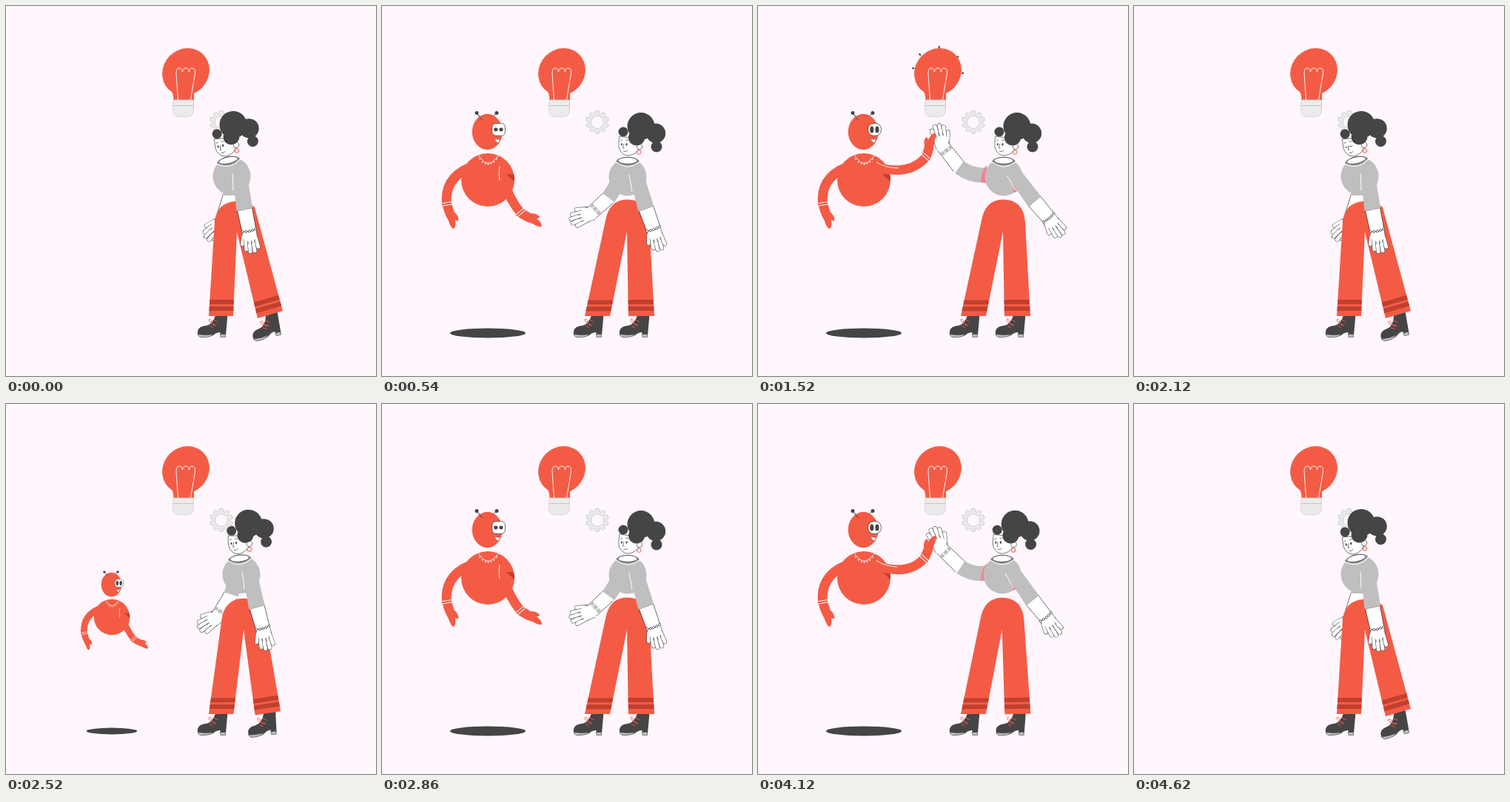
An HTML page for the animation above (4640 ms loop, 500 px wide and 500 px high).

```html
<!DOCTYPE html>
<html lang="en">
<head>
<meta charset="utf-8">
<title>High five</title>
<style>
html, body { margin: 0; width: 100%; height: 100%; overflow: hidden; background: #fff6fe; }
svg { display: block; width: 100vw; height: 100vh; }
</style>
</head>
<body>
<svg id="stage" viewBox="0 0 500 500"></svg>
<script>
const RED = '#f45b45', DEEP = '#c0402e', DARK = '#454545', GREY = '#bfbfbf', PALE = '#ebebeb', BG = '#fff6fe', PINK = '#f77f8b';
const CYCLE = 2320;

// Poses: pants outline, back foot, torso, head, near arm, far arm, robot
const walk = {
  pants: [274,419, 282,290, 286,266, 309,264, 326,263, 336,272, 374,412, 340,422, 312,305, 307,419],
  foot: [359,418,-15], torso: [305,230,-12], head: [-34.7,-1,-12.5], arm: [311,221,12],
  far: [303,225, 303,242, 303,256, 108,38,132], pink: [0],
  bot: [0,0, 0,0,0, 0], reach: [165,238, 173,262, 187,279, 30], crease: [159,217, 157,226, 159,236]
};
const stand = {
  pants: [274,419, 302,290, 307,262, 331,261.5, 359,262, 361,292, 368,419, 333,419, 331,305, 308,419],
  foot: [353,419,0], torso: [332,231,0], head: [0,0,0], arm: [338,222,20],
  far: [322,232, 314,248, 306,259, 137.6,31,158], pink: [0],
  bot: walk.bot, reach: walk.reach, crease: walk.crease
};
const raise = {
  ...stand, head: [4,1,0], arm: [338,222,39],
  far: [318,226, 296,229, 274,214, 234.5,34,263], pink: [1],
  bot: [-4,-2.5, -7.7,-3,-12, -12], reach: [158,215, 217,226, 217.5,191, -86], crease: [156,209, 168,217, 183,217]
};
const clap = {
  ...stand, arm: [338,222,40.5],
  far: [318,227, 293,233, 272,218, 232,36,254], pink: [1],
  reach: [162,218, 205,230, 227,204, -73], crease: [160,211, 172,219, 190,219]
};
const keys = [[0,walk],[40,walk],[370,stand],[720,stand],[1240,raise],[1360,clap],[1750,clap],[2060,walk],[CYCLE,walk]];

const clamp = x => Math.max(0, Math.min(1, x));
const seg = (t, a, b) => clamp((t - a) / (b - a));
const ease = x => (1 - Math.cos(Math.PI * x)) / 2;
const bump = (t, a, b) => Math.sin(Math.PI * seg(t, a, b));
const mix = (a, b, k) => a.map((v, i) => v + (b[i] - v) * k);
const polar = (x, y, deg, r) => [x + r * Math.cos(deg * Math.PI / 180), y + r * Math.sin(deg * Math.PI / 180)];

const path = (d, fill, stroke = 'none', w = 1, extra = '') =>
  `<path d="${d}" fill="${fill}" stroke="${stroke}" stroke-width="${w}" ${extra}/>`;
const line = (d, stroke, w = 1, cap = 'butt') => path(d, 'none', stroke, w, `stroke-linecap="${cap}"`);
const oval = (x, y, rx, ry, fill, stroke = 'none', w = .8) =>
  `<ellipse cx="${x}" cy="${y}" rx="${rx}" ry="${ry}" fill="${fill}" stroke="${stroke}" stroke-width="${w}"/>`;
const dot = (x, y, r, fill, stroke, w) => oval(x, y, r, r, fill, stroke, w);
const group = (tf, body) => `<g transform="${tf}">${body}</g>`;
const place = (x, y, deg, body) => group(`translate(${x} ${y}) rotate(${deg})`, body);

function poseAt(t) {
  let i = 0;
  while (i < keys.length - 2 && t >= keys[i + 1][0]) i++;
  const [ta, a] = keys[i], [tb, b] = keys[i + 1], k = ease(seg(t, ta, tb));
  const out = {};
  for (const n in a) out[n] = mix(a[n], b[n], k);
  return out;
}

function gear() {
  let d = '';
  for (let i = 0; i < 10; i++) {
    [[-13, 12], [-8, 15.5], [8, 15.5], [13, 12]].forEach(([a, r]) => {
      d += (d ? 'L' : 'M') + polar(291, 157, i * 36 - 90 + a, r);
    });
  }
  return path(d + 'Z', PALE, '#c6c6c6', .8, 'stroke-linejoin="round"') + dot(291, 157, 8.6, BG, '#c6c6c6');
}

const bulb =
  place(243, 89, -45, oval(0, 0, 33.2, 30.6, RED)) + path('M217 108Q227 115 226.500 127H254V118Q259 115 266 109Z', RED) +
  line('M232.500 127L230 91Q230 84 234 84Q238 84 238.500 89Q239 84 243 84Q247 84 247.500 89Q248 84 251 84Q256 84 255.500 91L249.500 127', '#fff', .9) +
  path('M226 127H253.500V141Q253 149.500 245 149.500H234Q226 149.500 225.500 141Z', PALE, '#cfcfcf', .8) +
  line('M225.500 134.500H253.500', '#bdbdbd', .8);
const scenery = bulb + gear();

function rays(t) {
  if (t < 1340 || t > 1720) return '';
  const len = 16 * Math.abs(Math.sin(Math.PI * (t - 1340) / 190));
  return [-172, -136, -87, -37, 3].map(a =>
    line(`M${polar(243, 89, a, 32)}L${polar(243, 89, a, 32.8 + len)}`, DARK, 2)).join('');
}

// Hand hanging down from the wrist at the local origin
const fingers = [[-8,5,-12,17], [-6,12,-8,25], [-2,13,-3,28.5], [3,13,3,28.5], [7,10,8.5,24]];
const hand = fingers.map(([a, b, c, d]) => {
  const f = `M${a} ${b}L${c} ${d}`;
  return line(f, DARK, 6, 'round') + line(f, '#fff', 4.9, 'round');
}).join('') + path('M-9.500 -2L-9.500 8Q-8 15 0 15Q8 15 9 10L9.500 -2Z', '#fff') +
  line('M-9.500 -2V5M9.500 -2L9.800 10M-4 14V18M1 14V19M5.500 13V17', DARK, .6);

const shoe =
  path('M-7.500 -2H8.500L6 26H-1.500V22Q-7 22 -11 26Q-15 28.500 -27 28.500Q-33 27 -32 20Q-30 13.500 -21 13Q-12 12 -7.500 -2Z', DARK) +
  path('M-32 24.500Q-22 26.500 -11 24.500Q-15 28.500 -22 28.500H-28Q-31 28 -32 24.500ZM-1.500 24.500H5.500V28.500H-1Z', GREY, DARK, .6) +
  line('M-13 10L-7 13M-16 13L-11 16M-10 5L-5 8M-13 10Q-19 6 -16 4Q-13 4 -13 10Q-10 14 -8 11', RED, .9);

// Trouser bands measured upward from the hem
function bands(hemA, topA, hemB, topB) {
  const up = ([x, y], [u, v], d) => {
    const k = d / Math.hypot(u - x, v - y);
    return [x + (u - x) * k, y + (v - y) * k];
  };
  return [7, 16].map(d => path(
    `M${up(hemA, topA, d)}L${up(hemA, topA, d + 6)}L${up(hemB, topB, d + 6)}L${up(hemB, topB, d)}Z`, DEEP)).join('');
}

function trousers(v) {
  const p = [];
  for (let i = 0; i < v.length; i += 2) p.push([v[i], v[i + 1]]);
  return path(`M${p[0]}L${p[1]}Q${p[2]} ${p[3]}Q${p[4]} ${p[5]}L${p[6]}L${p[7]}L${p[8]}L${p[9]}Z`, RED) +
    bands(p[0], p[1], p[9], p[8]) + bands(p[6], p[5], p[7], p[8]);
}

function farArm([sx, sy, cx, cy, ex, ey, fa, fl, ha]) {
  const [wx, wy] = polar(ex, ey, fa, fl);
  const fore = `M-9.500 0L-9 ${fl}M9.500 0L9 ${fl}`;
  const band = fl - 10;
  return place(wx, wy, ha - 90, hand) +
    dot(wx, wy, 8.8, '#fff') +
    place(ex, ey, fa - 90,
      path(`M-9.500 -1L-9 ${fl}H9L9.500 -1Z`, '#fff') + line(fore, DARK, .7) +
      path(`M-9 ${band}H9V${band + 5}H-9Z`, GREY) +
      line(`M-4 ${band}V${band + 5}M3 ${band}V${band + 5}`, '#fff', 1.2)) +
    line(`M${sx} ${sy}Q${cx} ${cy} ${ex} ${ey}`, GREY, 20);
}

const beads = [-9, -4.5, 0, 4.5, 9].map(x => dot(x, 84 + .03 * (81 - x * x) / 2, 1.5, '#fff', DARK, .8)).join('');
const nearArm =
  path('M-9.500 54L-9.500 86H9.500L10 54Z', '#fff') +
  line('M-10.500 55L-9.500 84M10.500 55L9.500 84M-10.500 55H10.500', DARK, .7) +
  place(0, 84, 2.5, hand) +
  line('M-10 84Q0 87 10 84', DARK, .8) + beads +
  path('M-6 3L-11 55H11L13 5Q12 -9 0 -9Z', GREY) +
  line('M-6 4Q-7 14 -10 27', '#fff', .9);

const collar =
  line('M-16.500 -20.500Q0 -7 17 -20.500', '#fff', .9) +
  path('M-15.500 -21.500Q0 -11 15.500 -21.500L12.500 -24Q0 -30 -12.500 -24Z', '#888', DARK, .4) +
  oval(0, -22, 13, 4.4, '#fff', DARK, .7);

function face(shut) {
  const eyes = shut > .5
    ? line('M322 187.500Q324 189 325.500 187.500M328.500 187.500Q330.500 189 332.500 187.500', DARK, .9)
    : oval(323.8, 187, 1, 1.7 - shut, DARK) + oval(330.5, 187, 1.1, 1.8 - shut, DARK);
  return path('M321 176Q319 187 320.500 193Q325 202.500 333 202Q341 201 346 195L350 180Z', '#fff', DARK, .7) +
    dot(348, 190, 3.8, '#fff', DARK, .7) + eyes +
    line('M322 182L325 181.500M329 181.500Q331 180.500 333 182M327 186L325.500 192H327.500M326 196Q329 198 332 195', DARK, .7) +
    dot(347.3, 197.7, 2.7, 'none', RED, 1) +
    dot(350, 162.5, 18.5, DARK) + oval(344, 178, 11, 10.5, DARK) + dot(370, 172, 13.2, DARK) +
    dot(371, 190, 7.5, DARK) + dot(326, 170, 6.5, DARK);
}

function woman(p, t) {
  const [tx, ty, tr] = p.torso, [ax, ay, aa] = p.arm, [hx, hy, hr] = p.head;
  const blink = bump(t, 2060, 2180);
  return farArm(p.far) +
    place(291, 419, 0, shoe) + place(...p.foot, shoe) + trousers(p.pants) +
    `<g opacity="${p.pink[0]}">${path('M309 215L304 222L300.500 237L309 240Z', PINK)}</g>` +
    place(tx, ty, tr, dot(0, 0, 25.5, GREY) +
      `<g opacity="${p.pink[0]}">${path('M10 3L18 20L14 21Z', PINK)}</g>`) +
    place(ax, ay, -aa, nearArm) +
    place(tx, ty, tr, collar) +
    group(`translate(${hx} ${hy}) rotate(${hr} 341 200)`, face(blink));
}

const mitt = path('M-4 -6Q6 -6 13 -6Q20 -10 25 -8Q27 -6 23 -4Q34 -2 34 2Q33 5 22 5Q10 8 -4 6Z', RED);
const cuff = line('M-1.500 -6.500V6.500M2 -6.500V6.500', '#fff', 1);

function robotHead(squint) {
  const pupil = 4.6 - 2.2 * squint;
  return line('M128 144L135 154M155 144L149 151', DARK, 1) +
    oval(142.3, 170, 20.5, 24.2, RED) + line('M131 148L135 154', DARK, 1) +
    dot(128, 144.5, 2.5, DARK) + dot(155, 144.5, 2.5, DARK) +
    `<rect x="148.8" y="158.7" width="17.6" height="16.6" rx="${7.5 - 2.5 * squint}" fill="#fff" stroke="${DARK}" stroke-width=".8"/>` +
    oval(153.8, 167, 2.6, pupil, DARK) + oval(161, 167, 2.6, pupil, DARK) +
    path('M152.500 179Q156 181 159.500 180Q159 184.500 156 184.500Q153 183 152.500 179Z', '#fff', DARK, .4);
}

function robot(p, t) {
  const size = Math.min(ease(seg(t, 60, 290)), 1 - ease(seg(t, 1800, 2030)));
  if (size < .004) return '';
  const jump = -40 * bump(t, 150, 430) - 13 * bump(t, 600, 900);
  const [bx, by, hx, hy, hr, lr] = p.bot;
  const [sx, sy, cx, cy, wx, wy, ha] = p.reach, c = p.crease;
  const wrist = Math.atan2(wy - cy, wx - cx) * 180 / Math.PI;
  let lace = '';
  for (let i = 0; i < 7; i++) {
    const k = (i + .5) / 7;
    lace += dot(130 + 27 * k, 204 + 40 * k * (1 - k), .9, '#fff');
  }
  const left = group(`rotate(${lr} 113 222)`,
    line('M117 219Q84 233 87.500 269', RED, 13) + place(88, 268, 72, mitt) + place(88, 267, 80, cuff));
  const body = group(`translate(${bx} ${by})`,
    left + dot(143, 235, 36, RED) + path('M168 227L178 227.500Q180 232 178.500 237Z', DEEP) +
    line('M130 201Q143 223 157 202', '#fff', .9) + lace);
  const arm = line(`M${sx} ${sy}Q${cx} ${cy} ${wx} ${wy}`, RED, 12.5, 'round') +
    place(wx, wy, ha, mitt) + place(wx, wy, wrist, cuff) +
    line(`M${c[0]} ${c[1]}Q${c[2]} ${c[3]} ${c[4]} ${c[5]}`, '#fff', .9);
  const head = group(`translate(${hx} ${hy}) rotate(${hr} 142 198)`, robotHead(bump(t, 470, 610)));
  return group(`translate(143 442) scale(${size}) translate(-143 -442)`,
    oval(143, 442, 51, 6.5, DARK) + group(`translate(0 ${jump})`, body + arm + head));
}

const stage = document.getElementById('stage');
function draw(ms) {
  const t = ms % CYCLE, p = poseAt(t);
  stage.innerHTML = rays(t) + scenery + woman(p, t) + robot(p, t);
}

const start = performance.now();
function tick() {
  draw(performance.now() - start);
  requestAnimationFrame(tick);
}
draw(0);
requestAnimationFrame(tick);
</script>
</body>
</html>
```
